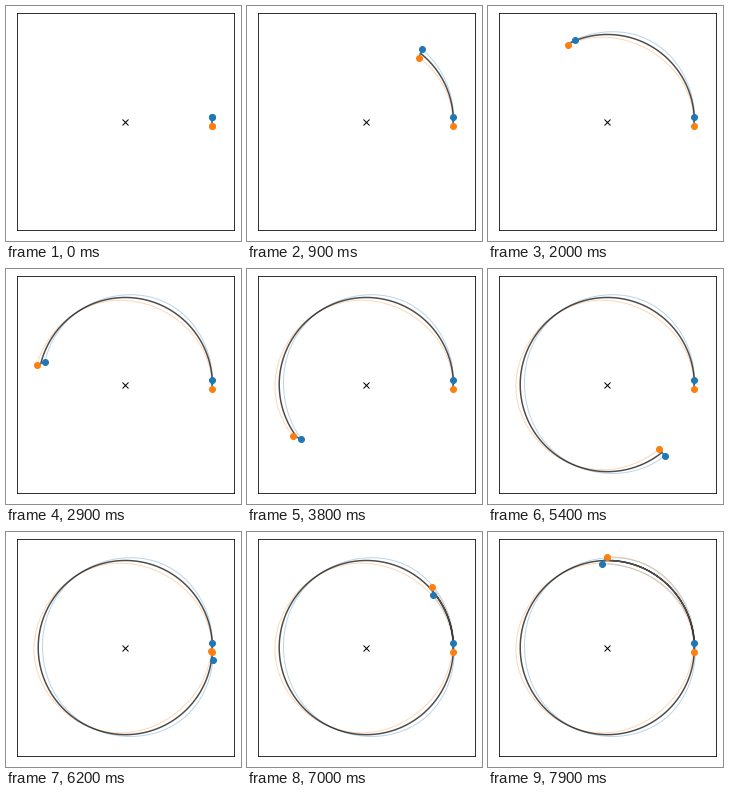
Animation, 235 px wide and 235 px high, one loop 8000 ms. Source, as a matplotlib script:

```python
import numpy as np
import matplotlib.pyplot as plt
from matplotlib.animation import FuncAnimation

SIZE, DPI = 235, 72
FRAMES, INTERVAL = 80, 100
SUB = 10                 # integration steps per frame
DT = 0.1 / SUB
HALF = 0.05              # half the rod length


def gravity(p):
    return -p / np.hypot(*p) ** 3


def rod(angle):
    return HALF * np.array([np.cos(angle), np.sin(angle)])


def deriv(s):
    """State: centre x, y, rod angle, then their velocities."""
    d = rod(s[2])
    ga, gb = gravity(s[:2] + d), gravity(s[:2] - d)
    diff = ga - gb
    spin = (d[0] * diff[1] - d[1] * diff[0]) / (2 * HALF ** 2)
    return np.concatenate([s[3:], (ga + gb) / 2, [spin]])


def simulate(steps):
    s = np.array([1, 0, np.pi / 2, 0, 1, 0])
    states = [s]
    for _ in range(steps):
        k1 = deriv(s)
        k2 = deriv(s + DT / 2 * k1)
        k3 = deriv(s + DT / 2 * k2)
        k4 = deriv(s + DT * k3)
        s = s + DT / 6 * (k1 + 2 * k2 + 2 * k3 + k4)
        states.append(s)
    return np.array(states)


states = simulate((FRAMES - 1) * SUB)
mid = states[:, :2]
arm = rod(states[:, 2]).T
blue, orange = mid + arm, mid - arm

fig = plt.figure(figsize=(SIZE / DPI, SIZE / DPI), dpi=DPI, facecolor="white")
margin, side = 10.7 / SIZE, 217.44 / SIZE
ax = fig.add_axes([margin, margin, side, side])
ax.set(xlim=(-1.25, 1.25), ylim=(-1.25, 1.25), xticks=[], yticks=[])

ax.plot(0, 0, "kx")


def dumbbell():
    bar, = ax.plot([], [], "-", color="C0", lw=1.5, zorder=3)
    a, = ax.plot([], [], "o", color="C0", zorder=4)
    b, = ax.plot([], [], "o", color="C1", zorder=4)
    return bar, a, b


def place(parts, i):
    p, q = blue[i], orange[i]
    bar, a, b = parts
    bar.set_data([p[0], q[0]], [p[1], q[1]])
    a.set_data([p[0]], [p[1]])
    b.set_data([q[0]], [q[1]])


trails = [
    (ax.plot([], [], color="C0", alpha=0.3, lw=1)[0], blue),
    (ax.plot([], [], color="C1", alpha=0.3, lw=1)[0], orange),
    (ax.plot([], [], color="k", alpha=0.7, lw=1.5)[0], mid),
]
place(dumbbell(), 0)
mover = dumbbell()


def update(frame):
    i = frame * SUB
    for line, path in trails:
        line.set_data(path[:i + 1, 0], path[:i + 1, 1])
    place(mover, i)
    return [line for line, _ in trails] + list(mover)


anim = FuncAnimation(fig, update, frames=FRAMES, interval=INTERVAL,
                     repeat=True, repeat_delay=0)
plt.show()
```
